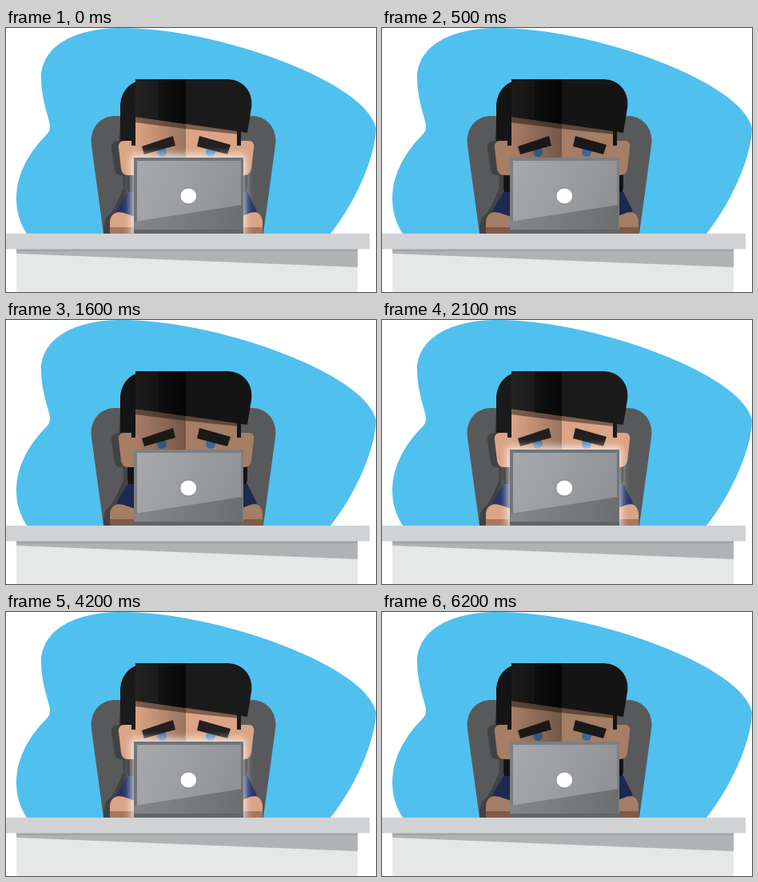
Recreate the animation shown at these times as an HTML page. Size 463x330 px, loop 6400 ms.

```html
<!DOCTYPE html>
<html lang="en">
<head>
<meta charset="utf-8">
<title>Working late</title>
<style>
  html, body { margin: 0; width: 100%; height: 100%; overflow: hidden; background: #fff; }
  svg { display: block; width: 463px; height: 330px; }
  .skin { fill: #dba485; }
  .hair { fill: #1a1a1a; }
  .brow { fill: #231f20; }
  .eye { fill: #4c8cc9; }
  .shirt { fill: #27346a; }
  .cuff { fill: #a67860; }
  #glow { fill: #fff; opacity: .72; filter: blur(5px); }
  .dark #person { filter: brightness(.76); }
  .dark #glow { display: none; }
  .dark #frame { fill: #7c7f82; }
</style>
</head>
<body>
<svg id="scene" viewBox="0 0 463 330">
  <defs>
    <linearGradient id="shade">
      <stop offset="0" stop-opacity="0"/>
      <stop offset="1" stop-opacity=".3"/>
    </linearGradient>
    <linearGradient id="hairShade">
      <stop offset="0" stop-color="#242322"/>
      <stop offset=".45" stop-color="#1b1a1a"/>
      <stop offset=".46" stop-color="#121212"/>
      <stop offset="1" stop-color="#070707"/>
    </linearGradient>
    <linearGradient id="lid" x2="1" y2=".3">
      <stop offset="0" stop-color="#a7a9ac"/>
      <stop offset="1" stop-color="#919396"/>
    </linearGradient>
    <linearGradient id="lidShade">
      <stop offset="0" stop-color="#858789"/>
      <stop offset="1" stop-color="#6c6e70"/>
    </linearGradient>
  </defs>

  <path fill="#50c0ef" d="M26 257C17 243 13 229 13 213C13 180 32 152 51 133C55 129 56 124 54 117C50 101 44 85 44 62C44 30 74 0 146 0C262 0 450 66 463 125C462 166 433 224 406 257Z"/>

  <path fill="#58595b" d="M122 257L107 147C104 125 118 110 136 110H308C326 110 340 125 337 147L322 257Z"/>
  <path fill="#414244" d="M143 112L141 141C134 141 131 146 132 151L136 178C137 183 140 184 146 184L147 200L137 222L130 233C124 236 122 242 122 257H160V112Z"/>

  <g id="person">
    <path class="hair" d="M152 180H302V195C302 214 292 225 280 225H176C160 225 152 212 152 195Z"/>
    <path class="shirt" d="M152 205L138 229L165 240V205ZM302 205L314 229L290 240V205Z"/>
    <path class="skin" d="M130 257V243C130 234 137 228 147 231L165 237V257ZM321 257V243C321 234 315 228 306 231L290 237V257Z"/>
    <path class="cuff" d="M130 249H165V257H130ZM290 249H321V257H290Z"/>
    <path class="skin" d="M162 141H148C143 141 140 145 141 150L144 176C145 181 148 184 152 184H162ZM290 141H304C309 141 311 145 310 150L307 176C306 181 303 184 298 184H290Z"/>
    <path class="skin" d="M161 100H291V184H161Z"/>
    <path fill="#805d4c" d="M161 109V118L225 126L291 133V126Z"/>
    <circle class="eye" cx="195" cy="155" r="6"/>
    <circle class="eye" cx="256" cy="155" r="6"/>
    <path fill="url(#shade)" d="M162 108H225V184H162Z"/>
    <path class="brow" d="M170 148L209 135L212 147L173 158ZM242 135L281 146L277 158L239 148Z"/>
    <path class="hair" d="M143 141V99C143 78 157 64 178 64H276C297 64 310 80 307 100L302 131L294 130V147H289V129L162 111V147H157V141Z"/>
    <path fill="url(#hairShade)" d="M162 64H225V120L162 111Z"/>
  </g>

  <rect id="glow" x="156" y="158" width="144" height="104" rx="5"/>

  <path id="frame" fill="#70757a" d="M160 162H297V257H160Z"/>
  <path fill="url(#lid)" d="M164 166H294V252H164Z"/>
  <path fill="url(#lidShade)" d="M161 242L296 221V252H161Z"/>
  <path fill="#626466" d="M160 252H297V257H160Z"/>
  <ellipse cx="228.300" cy="210" rx="10.500" ry="10" fill="#fff" stroke="#7c7e80" stroke-width=".8"/>

  <path fill="#e6e7e7" d="M13 276H440V330H13Z"/>
  <path fill="#b1b2b4" d="M13 276H440V299L13 282Z"/>
  <path fill="#a3a4a6" d="M13 276H440V279H13Z"/>
  <path fill="#d1d3d4" d="M0 257H455V276.500H0Z"/>
</svg>
<script>
  const LOOP = 6400;
  // Spans in ms when the screen light is off.
  const blackouts = [[500, 600], [1600, 2100], [4100, 4200], [6200, LOOP]];
  const scene = document.getElementById('scene');
  const start = performance.now();

  function draw(now) {
    const t = Math.max(0, now - start) % LOOP;
    scene.classList.toggle('dark', blackouts.some(([from, to]) => t >= from && t < to));
    requestAnimationFrame(draw);
  }
  draw(start);
</script>
</body>
</html>
```
